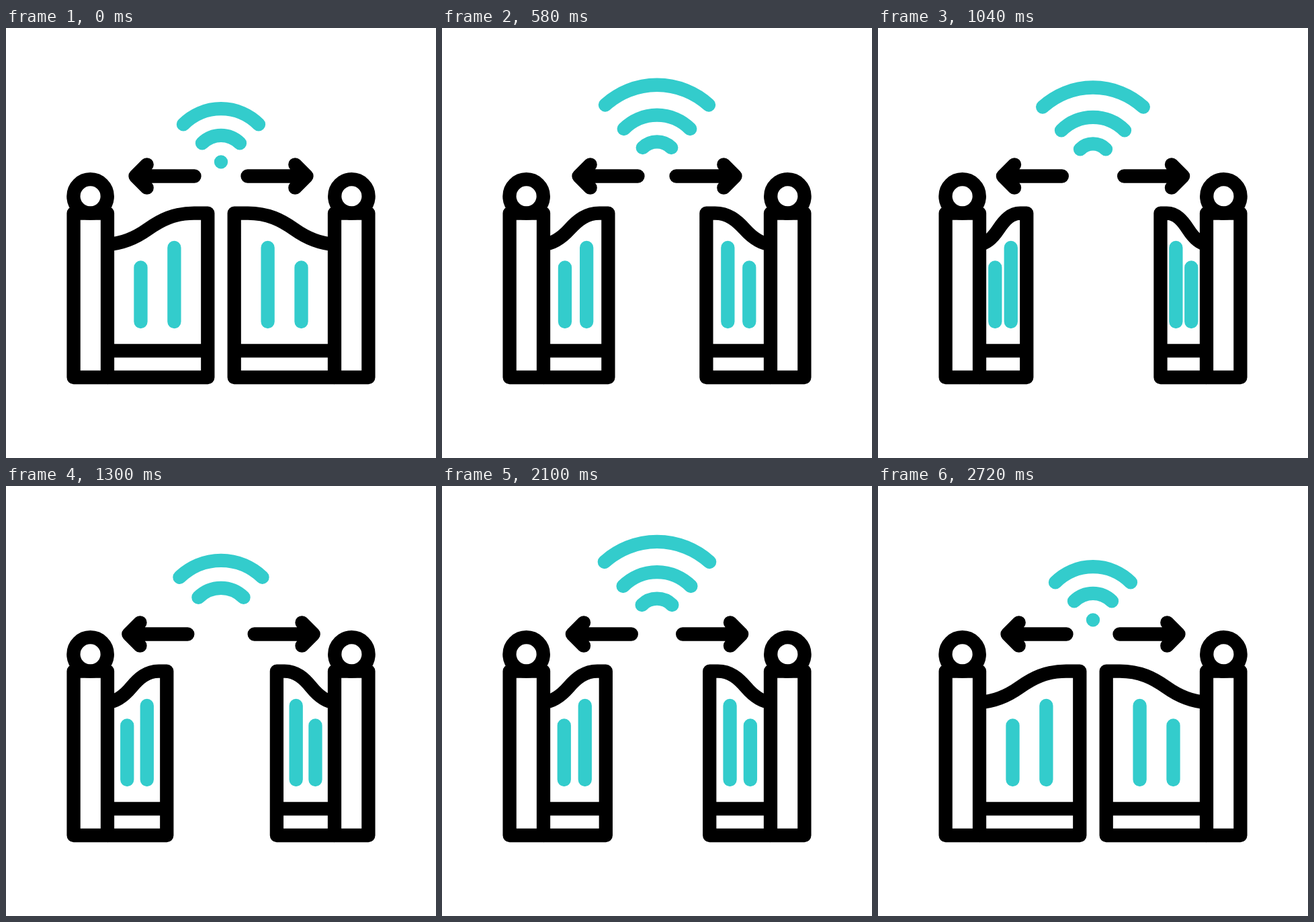
Animation of 640x640 px, one loop 3 s. Source, as an HTML page:

```html
<!DOCTYPE html>
<html lang="en">
<head>
<meta charset="utf-8">
<title>Automatic gate</title>
<style>
  html, body { margin: 0; height: 100%; overflow: hidden; background: #fff; }
  svg { display: block; width: 100%; height: 100%; }
  path, circle { fill: none; stroke: #000; stroke-width: 20.3; stroke-linejoin: round; }
  .round { stroke-linecap: round; }
  .teal { stroke: #3cc; stroke-linecap: round; }
</style>
</head>
<body>
<svg viewBox="0 0 640 640">
  <g id="left"></g>
  <g id="right" transform="matrix(-1 0 0 1 640 0)"></g>
  <path id="waves" class="teal"/>
</svg>
<script>
const LOOP = 3000, STEP = 20, START = 200, END = 2700, CYCLE = 500;
const HINGE = 151, EDGE = 300.3;
const $ = id => document.getElementById(id);

// Keyframes are [time, value] pairs with an eased move between neighbours.
function tween(keys, t) {
  const i = keys.findIndex(k => t < k[0]);
  if (i < 0) return keys[keys.length - 1][1];
  if (i === 0) return keys[0][1];
  const [t0, a] = keys[i - 1], [t1, b] = keys[i];
  const u = (t - t0) / (t1 - t0);
  return a + (b - a) * u * u * (3 - 2 * u);
}

const gateKeys = (peak, open) =>
  [[200, 0], [900, peak], [1200, open], [2000, open], [2600, 0]];
const arrowKeys = [[200, 0], [700, 12.85], [1200, -12.85], [1700, 12.85], [2200, 0]];

function makeSide(id, keys) {
  const group = $(id);
  group.innerHTML = `
    <path class="door"/>
    <path class="bars teal"/>
    <path d="M100.6 275.6H151V520H100.6Z"/>
    <circle cx="125.6" cy="250.4" r="25.2"/>
    <path class="arrow round" d="M280.5 220.5H192.5L209.7 203.3M192.5 220.5L209.7 237.7"/>`;
  const [door, bars, arrow] = ['door', 'bars', 'arrow'].map(c => group.querySelector('.' + c));
  return t => {
    const squeeze = 1 - tween(keys, t) / (EDGE - HINGE);
    const x = v => HINGE + (v - HINGE) * squeeze;
    door.setAttribute('d', `M151 322C${x(172)} 321 ${x(192)} 313 ${x(211)} 299.5
      S${x(250)} 275.6 ${x(280)} 275.6H${x(EDGE)}V520H151M151 480.3H${x(EDGE)}`);
    bars.setAttribute('d', `M${x(200.5)} 356.5V437M${x(250.4)} 327V437`);
    arrow.setAttribute('transform', `translate(${tween(arrowKeys, t)})`);
  };
}

// An arc around the emitter, from one end (-dx, -dy) to its mirror.
function arc(dx, dy) {
  const r = Math.hypot(dx, dy), y = 199.4 - dy;
  return `M${320 - dx} ${y}A${r} ${r} 0 0 1 ${320 + dx} ${y}`;
}

function drawWaves(t) {
  const moving = t > START && t <= END;
  const p = moving ? ((t - START - STEP) % CYCLE + STEP) / CYCLE : 0;
  let d = arc(56 + 27.7 * p, 56 + 38 * p) + arc(28 + 28 * p, 28 + 28 * p);
  if (!moving || t < START + CYCLE || p > 0.28) {
    const s = Math.max(28 * p, 0.01);
    d += arc(s, s);
  }
  $('waves').setAttribute('d', d);
}

const parts = [
  makeSide('left', gateKeys(93.8, 61)),
  makeSide('right', gateKeys(95.2, 63.2)),
  drawWaves
];

function frame() {
  const t = Math.floor(performance.now() % LOOP / STEP) * STEP;
  parts.forEach(draw => draw(t));
  requestAnimationFrame(frame);
}
frame();
</script>
</body>
</html>
```
